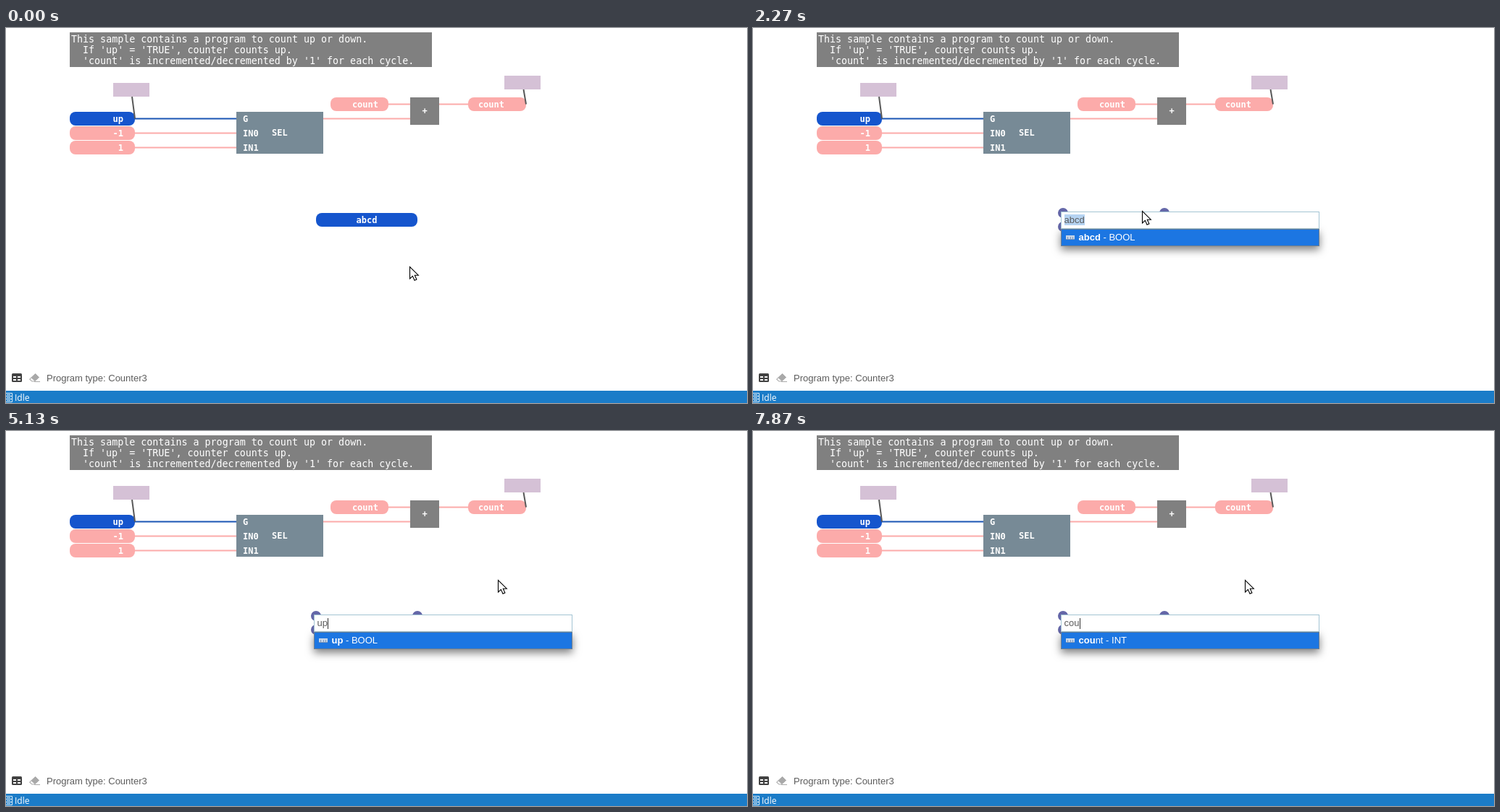
Recreate the animation shown at these times as an HTML page. Size 1023 by 519 pixels, loop 8000 ms.

```html
<!DOCTYPE html>
<html lang="en">
<head>
<meta charset="utf-8">
<title>Variable editor</title>
<style>
html, body { margin: 0; width: 100%; height: 100%; overflow: hidden; background: #fff; }
svg { display: block; }
text { white-space: pre; }
.note { font: 13.333px "DejaVu Sans Mono", monospace; fill: #fff; }
.label { font: bold 12px "DejaVu Sans Mono", monospace; fill: #fff; }
.ui { font: 13px "Liberation Sans", Arial, sans-serif; fill: #5c5c5c; }
.bold { font-weight: bold; }
.end { text-anchor: end; }
.mid { text-anchor: middle; }
.pink { fill: #fcabaa; }
.blue { fill: #1555cd; }
.wire { stroke: #fcabaa; stroke-width: 2; }
.link { stroke: #5a5a5a; stroke-width: 2; }
.white { fill: #fff; }
</style>
</head>
<body>
<svg width="1023" height="519">
  <defs>
    <filter id="popupShadow" x="-20%" y="-100%" width="140%" height="300%">
      <feDropShadow dx="0" dy="5" stdDeviation="6" flood-opacity=".5"/>
    </filter>
    <filter id="tipShadow" x="-30%" y="-30%" width="160%" height="170%">
      <feDropShadow dx="0" dy="1" stdDeviation="2.5" flood-opacity=".4"/>
    </filter>
  </defs>

  <rect x="88" y="6" width="500" height="48" fill="#808080"/>
  <g class="note">
    <text x="90" y="20">This sample contains a program to count up or down.</text>
    <text x="106" y="35">If 'up' = 'TRUE', counter counts up.</text>
    <text x="106" y="50">'count' is incremented/decremented by '1' for each cycle.</text>
  </g>

  <path class="wire" d="M177 145.5H318M177 165.5H318M438 125.5H558M527 105.5H558M598 105.5H639"/>
  <path d="M177 125.5H318" stroke="#1a55b4" stroke-width="2"/>
  <g id="pills"></g>
  <path class="link" d="M174 95L178 125.5M714.5 85L718 105.5"/>
  <path fill="#d5c1d6" d="M148 76h50v19h-50zM688 66h50v19h-50z"/>
  <rect x="318" y="116" width="120" height="58" fill="#778a96"/>
  <rect x="558" y="96" width="40" height="38" fill="#808080"/>
  <g class="label">
    <text x="327" y="130">G</text>
    <text x="327" y="150">IN0</text>
    <text x="327" y="170">IN1</text>
    <text x="367" y="149">SEL</text>
    <text class="mid" x="578" y="119">+</text>
  </g>

  <rect id="hover" x="428" y="256" width="140" height="19" rx="8" fill="none"
        stroke="#ee5a2c" stroke-width="3" stroke-dasharray="8 6" stroke-dashoffset="-5"/>
  <text class="label mid" x="498" y="270">abcd</text>
  <g id="handles" fill="#6467a8">
    <circle cx="428" cy="256" r="7"/><circle cx="568" cy="256" r="7"/>
    <circle cx="428" cy="275" r="7"/><circle cx="568" cy="275" r="7"/>
  </g>
  <g id="tip">
    <rect x="494.5" y="288.5" width="42" height="26" rx="1.5" fill="#fff" stroke="#c4c4c4" filter="url(#tipShadow)"/>
    <text class="note bold" x="500" y="306" style="fill:#444">abcd</text>
  </g>

  <rect x="8" y="478" width="14" height="12" rx="1.5" fill="#424242"/>
  <path class="white" d="M10 482h4v2h-4zM16 482h4v2h-4zM10 486h4v2h-4zM16 486h4v2h-4z"/>
  <path d="M40.5 478.5L45.5 483.5 39.5 489H35.5L32.5 486Z" fill="#a9a9a9" stroke="#a9a9a9" stroke-linejoin="round"/>
  <path d="M35 484.5L39.5 488.5H36L33.5 486Z" fill="#fff"/>
  <path d="M39 489.5H47" stroke="#a9a9a9"/>
  <text class="ui" x="56" y="489">Program type: Counter3</text>

  <rect y="502" width="1023" height="17" fill="#1b7cc8"/>
  <path d="M-1 505.5H8.5V517.5H-1M0 509.5H8M0 513.5H8M1 507.5H6M1 511.5H6M1 515.5H6" fill="none" stroke="#d5e8f5"/>
  <text x="12" y="516" class="white" style="font:12px 'Open Sans','Noto Sans',sans-serif">Idle</text>

  <g id="lists"></g>
  <g id="field">
    <rect x="425.5" y="254.5" width="356" height="23" fill="#fff" stroke="#a3c4d3"/>
    <rect id="selection" x="430" y="258" width="28" height="15" fill="#b5d3f1"/>
    <text id="entry" class="ui" x="429.5" y="270"></text>
    <rect id="caret" y="259" width="1" height="15" fill="#333"/>
    <g id="spinner" fill="#555"></g>
  </g>
  <path id="pointer" d="M.5.5V17L4.4 13.4 7 19.3 9.9 18 7.3 12.2H12.3Z" fill="#fff" stroke="#000" stroke-width="1.1"/>
</svg>
<script>
const LOOP = 8000, TICK = 200 / 3;
const $ = id => document.getElementById(id);
const show = (el, on) => { el.style.display = on ? '' : 'none'; };

// x, y, width, colour, label, label's right end
const pills = [
  [88, 116, 90, 'blue', 'up', 162], [88, 136, 90, 'pink', '-1', 162],
  [88, 156, 90, 'pink', '1', 162], [448, 96, 80, 'pink', 'count', 514],
  [638, 96, 80, 'pink', 'count', 688], [428, 256, 140, 'blue', '', 0]
];
$('pills').innerHTML = pills.map(([x, y, w, color, label, end]) =>
  `<rect class="${color}" x="${x}" y="${y}" width="${w}" height="19" rx="8"/>
   <text class="label end" x="${end}" y="${y + 14}">${label}</text>`).join('');

const icons = {
  picked: y => `<rect x="432" y="${y - 3}" width="12" height="6" fill="#c6d5e8"/>
    <path d="M432 ${y + 2.5}h12M434.5 ${y - 1}v3M438.5 ${y - 1}v3M441.5 ${y - 1}v3" stroke="#7d96b8"/>`,
  local: y => `<path d="M430 ${y + .5}h16" stroke="#444"/>
    <rect x="432.5" y="${y - 2.5}" width="11" height="6" fill="#b9d2f7" stroke="#5b6f92"/>`,
  output: y => `<path d="M434 ${y + .5}h-4M432.5 ${y - 2}l-2.5 2.5 2.5 2.5" fill="none" stroke="#333"/>
    <rect x="434.5" y="${y - 2.5}" width="11" height="6" fill="#b9d2f7" stroke="#5b6f92"/>`,
  type: y => `<circle cx="438.5" cy="${y + .5}" r="6.5" fill="#9b663e"/>
    <path d="M441 ${y - 2.5}h-4v6h4M437 ${y + .5}h3.5" fill="none" stroke="#fff" stroke-width="1.5"/>`
};

const row = (icon, bold, rest, i) => {
  const y = 290 + 22 * i;
  return icons[icon](y) + `<text class="ui" x="449.5" y="${y + 4}"${i ? '' : ' style="fill:#fff"'}>` +
    `<tspan class="bold">${bold}</tspan>${rest}</text>`;
};

const singleList = (bold, rest) =>
  `<rect x="425.5" y="278.5" width="356" height="23" fill="#1d76e2" stroke="#6d7f92" filter="url(#popupShadow)"/>` +
  row('picked', bold, rest, 0);

const allRows = [
  ['picked', 'abc - BOOL'], ['local', 'abcd - BOOL'], ['type', 'CAN_RETURN_CODE'],
  ['type', 'CAN_TRIPLESAMPLING_VALUE'], ['local', 'count - INT'], ['output', 'ENO - BOOL'],
  ['type', 'GPIOPinFlags'], ['type', 'MB_PARITY'], ['type', 'MQTT_RC'],
  ['type', 'MQTT_SUBSCRIBER_STATE'], ['local', 'up - BOOL']
];
const lists = {
  abcd: singleList('abcd', ' - BOOL'),
  up: singleList('up', ' - BOOL'),
  cou: singleList('cou', 'nt - INT'),
  all: `<rect x="425.5" y="278.5" width="356" height="270" fill="#fff" stroke="#858585" filter="url(#popupShadow)"/>
    <rect x="426" y="279" width="345" height="22" fill="#1d76e2"/>
    <rect x="771" y="279" width="10" height="203" fill="#c1c1c1"/>` +
    allRows.map(([icon, name], i) => row(icon, '', name, i)).join('')
};
$('lists').innerHTML = Object.entries(lists).map(([id, body]) => `<g id="list-${id}">${body}</g>`).join('');

$('spinner').innerHTML = Array.from({ length: 8 }, (_, i) => {
  const a = i * Math.PI / 4;
  return `<circle cx="${766 + 5.5 * Math.cos(a)}" cy="${265 + 5.5 * Math.sin(a)}" r="1.2"/>`;
}).join('');
const dots = [...$('spinner').children];

// tick, text, caret, list, spinner
const steps = [
  [32, 'abcd', 0, '', 0], [34, 'abcd', 0, 'abcd', 0],
  [59, '', 1, 'abcd', 0], [61, '', 1, 'abcd', 1], [62, '', 1, 'all', 0], [67, '', 0, 'all', 0],
  [71, 'u', 1, 'all', 0], [74, 'up', 1, 'all', 1], [77, 'up', 1, 'up', 0],
  [82, 'up', 0, 'up', 0], [92, 'up', 1, 'up', 0], [100, 'up', 0, 'up', 0],
  [101, 'u', 1, 'up', 0], [104, '', 0, 'up', 1], [105, '', 1, 'up', 1],
  [107, '', 1, 'all', 0], [110, '', 0, 'all', 0],
  [113, 'c', 1, 'all', 0], [114, 'co', 1, 'all', 0], [115, 'cou', 1, 'all', 0],
  [116, 'cou', 1, 'all', 1], [118, 'cou', 1, 'cou', 0]
];

// first tick, last tick, from, to
const moves = [
  [7, 8, [557, 330], [551, 309]],
  [9, 18, [551, 309], [498, 266]],
  [31, 41, [498, 266], [679, 206]]
];

function pointerAt(tick) {
  const [from, to, a, b] = moves.filter(m => tick >= m[0]).pop() || moves[0];
  const p = Math.min(1, Math.max(0, (tick - from) / (to - from)));
  const e = p * p * (3 - 2 * p);
  return a.map((v, i) => Math.round(v + (b[i] - v) * e));
}

function render(time) {
  const tick = Math.floor((time % LOOP + 4) / TICK);
  const [x, y] = pointerAt(tick);
  $('pointer').setAttribute('transform', `translate(${x} ${y})`);

  const step = steps.filter(s => s[0] <= tick).pop();
  show($('hover'), tick >= 10 && y < 275 && !step);
  show($('handles'), tick >= 29);
  show($('tip'), tick >= 29 && !step);
  show($('field'), step);

  const [, text, caret, list, spin] = step || [0, '', 0, '', 0];
  for (const id in lists) show($('list-' + id), id === list);
  $('entry').textContent = text;
  show($('selection'), text === 'abcd');
  show($('caret'), caret);
  if (caret) $('caret').setAttribute('x', Math.round(429.8 + $('entry').getComputedTextLength()));
  show($('spinner'), spin);
  dots.forEach((dot, i) => { dot.style.opacity = 1 - ((tick - i + 160) % 8) * .08; });
}

const start = performance.now();
(function frame() {
  render(performance.now() - start);
  requestAnimationFrame(frame);
})();
</script>
</body>
</html>
```
